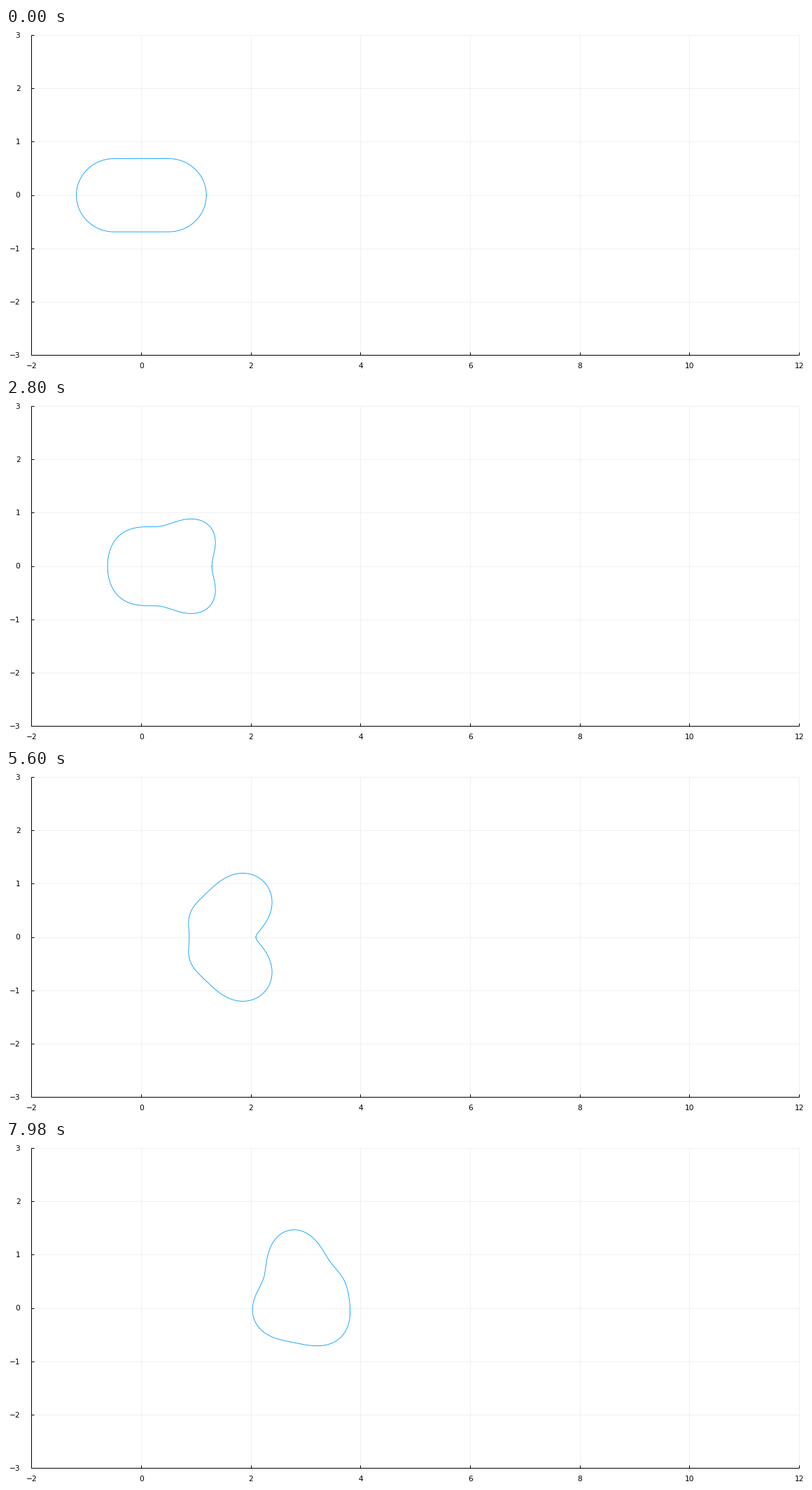
A matplotlib script for the animation above (8 s loop, 1143x490 px).

```python
import numpy as np
import matplotlib.pyplot as plt
from matplotlib.animation import FuncAnimation

W, H, DPI = 1143, 490, 64
PX = 72 / DPI                      # points per pixel
FRAMES, STEP = 400, 20             # count, milliseconds
UNIT_X, UNIT_Y = 78.32, 76.28      # pixels per axis unit
FRAME_ORIGIN = 193.0, 238.6        # origin of grid and axes
DROP_ORIGIN = 193.4, 238.9         # origin of the curve
OMEGA2 = 9.4                       # angular speed of the second mode
MODES = 30
END, KICK = 7.98, 7.2              # last moment and start of the upward push

theta = np.linspace(0, 2 * np.pi, 361)
order = np.arange(MODES)
omega = OMEGA2 * np.sqrt(np.maximum(order ** 2 - 1, 0) / 3)
cos_n = np.cos(np.outer(order, theta))
sin_n = np.sin(np.outer(order, theta))


def stadium(half=0.5, rad=0.6855):
    c, s = np.abs(np.cos(theta)), np.abs(np.sin(theta))
    cap = half * c + np.sqrt(rad ** 2 - (half * s) ** 2)
    return np.where(rad * c <= half * s, rad / np.maximum(s, 1e-9), cap)


start = 2 * np.fft.rfft(stadium()[:-1]).real[:MODES] / (len(theta) - 1)
area = np.mean(stadium()[:-1] ** 2)   # mean squared radius, kept constant

# Key points of the leading modes 2 to 6; the first is the stadium at rest
times = [0, 1.18, 2.80, 3.96, 4.86, 6.34, END]
keys = {
    2: [start[2], -.036, .096, -.047, -.169, -.215, -.105],
    3: [0, .140, -.091, -.152, -.088, .013, .021],
    4: [start[4], -.045, -.085, .018, .053, .045, .007],
    5: [0, -.012, -.010, .014, .021, -.026, -.010],
    6: [start[6], .016, -.005, .001, -.014, -.009, -.003],
}
tilt = np.zeros(MODES)
tilt[2:6] = -.047, -.112, .049, .017   # sine parts raised by the push
LIFT = 0.258


def phase_track(n, values):
    """Unwrapped phases that meet every key near the natural frequency."""
    base = np.arccos(np.array(values) / np.abs(values).max())
    track = [base[0]]
    for k in range(1, len(times)):
        guess = track[-1] + omega[n] * (times[k] - times[k - 1])
        options = [p + 2 * np.pi * np.round((guess - p) / (2 * np.pi))
                   for p in (base[k], -base[k])]
        track.append(min(options, key=lambda p: abs(p - guess)))
    return track


tracks = {n: phase_track(n, v) for n, v in keys.items()}


def outline(t):
    a = start * np.cos(omega * t) * np.exp(-t / 0.5)
    a[1::2] = 0
    u = min(t / 1.1, 1)
    grow = u * u * (3 - 2 * u)
    for n, track in tracks.items():
        a[n] = np.abs(keys[n]).max() * np.cos(np.interp(t, times, track))
        if n % 2:
            a[n] *= grow
    push = min(max((t - KICK) / (END - KICK), 0), 1) ** 2
    b = push * tilt * np.cos(omega * (t - END))
    a[0] = 0
    a[0] = np.sqrt(area - (a @ a + b @ b) / 2)
    r = a @ cos_n + b @ sin_n
    x = 0.057 * t ** 2 - 0.000174 * t ** 4 + r * np.cos(theta)
    y = LIFT * push + r * np.sin(theta)
    return DROP_ORIGIN[0] + UNIT_X * x, DROP_ORIGIN[1] - UNIT_Y * y


fig = plt.figure(figsize=(W / DPI, H / DPI), dpi=DPI, facecolor="white")
ax = fig.add_axes([0, 0, 1, 1])
ax.set(xlim=(0, W), ylim=(H, 0))
ax.axis("off")

xticks = [(v, FRAME_ORIGIN[0] + UNIT_X * v) for v in range(-2, 13, 2)]
yticks = [(v, FRAME_ORIGIN[1] - UNIT_Y * v) for v in range(-3, 4)]
left, right = xticks[0][1], xticks[-1][1]
bottom, top = yticks[0][1], yticks[-1][1]


def line(x, y, color, z):
    ax.plot(x, y, color=color, lw=PX, zorder=z, solid_capstyle="butt")


def label(x, y, value, align):
    ax.text(x, y, str(value).replace("-", "\u2212"), ha=align, va="baseline",
            family="DejaVu Sans", fontsize=10.67 * PX, color="black")


for v, x in xticks:
    line([x, x], [top, bottom], "#f0f0f0", 1)
    line([x, x], [bottom, bottom - 4], "black", 3)
    label(x + 0.4, 486, v, "center")
for v, y in yticks:
    line([left, right], [y, y], "#f0f0f0", 1)
    line([left, left + 4], [y, y], "black", 3)
    label(20.5, y + 3.8, v, "right")
line([left, right], [bottom, bottom], "black", 3)
line([left, left], [top, bottom], "black", 3)

drop, = ax.plot([], [], color="#009afa", lw=0.85 * PX, zorder=4,
                solid_joinstyle="round")


def update(i):
    drop.set_data(*outline(i * STEP / 1000))
    return drop,


anim = FuncAnimation(fig, update, frames=FRAMES, interval=STEP,
                     init_func=lambda: update(0), repeat=True, repeat_delay=0)
plt.show()
```
